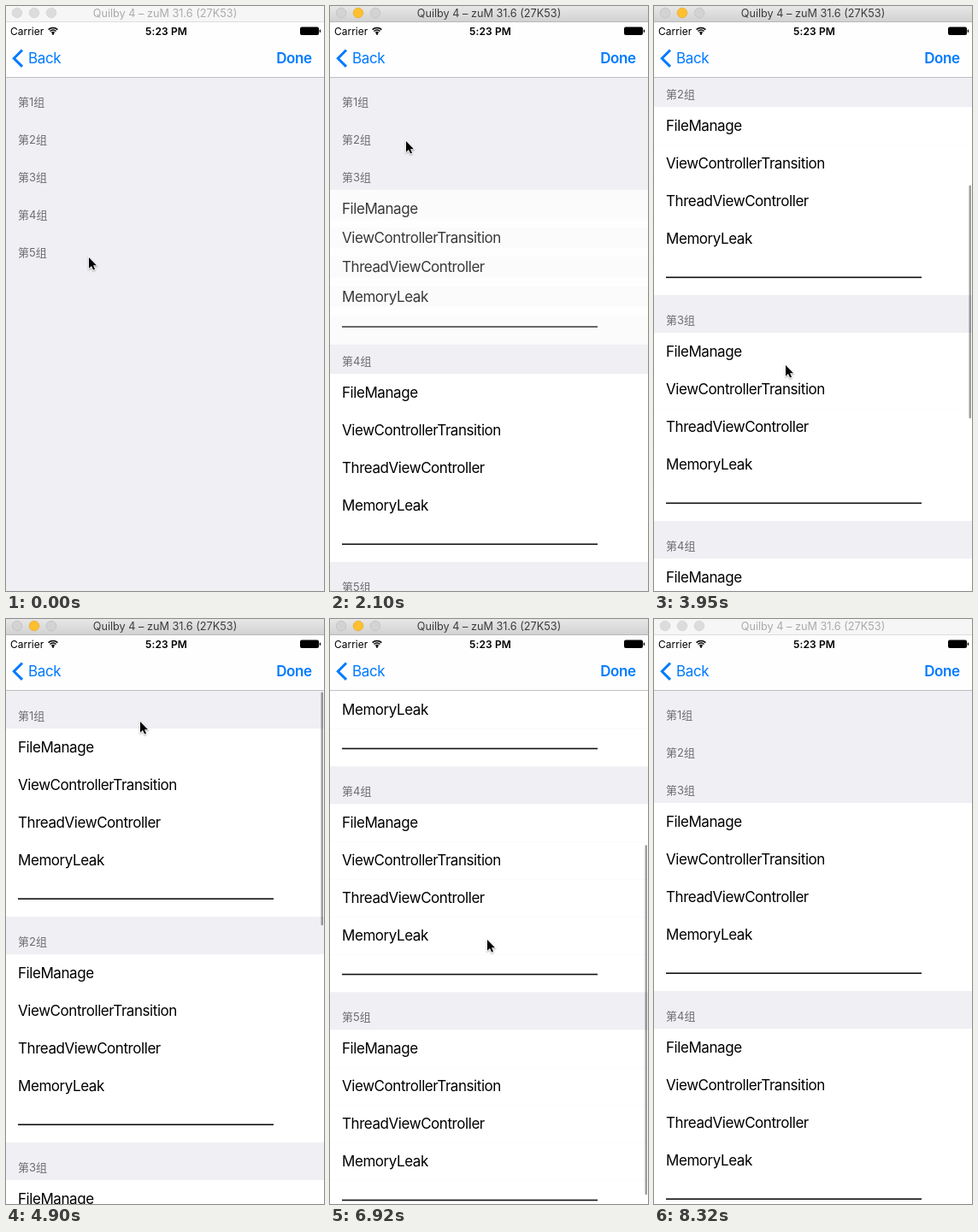
An HTML page with a canvas for the animation above (8390 ms loop, 372 by 684 pixels).

```html
<!DOCTYPE html>
<html lang="en">
<head>
<meta charset="utf-8">
<title>Collapsible groups</title>
<style>
  html, body { margin: 0; width: 100%; height: 100%; overflow: hidden; background: #efeff4; }
  canvas { display: block; }
</style>
</head>
<body>
<canvas id="stage" width="372" height="684"></canvas>
<script>
const ctx = document.getElementById('stage').getContext('2d');
const LOOP = 8390, STEP = 87.6;
const WIDTH = 372, HEIGHT = 684, TOP = 83, VIEW = 603, CELL = 44;
const FONT = 'Inter, "Noto Sans CJK SC", "Noto Sans CJK", sans-serif';
const BLUE = '#007aff';
const GROUPS = [1, 2, 3, 4, 5];
const ROWS = ['FileManage', 'ViewControllerTransition', 'ThreadViewController', 'MemoryLeak', null];

// What the pointer does: tap a group header, flick the list there and back, or leave.
const ACTIONS = [
  { at: 745, x: 97, y: 294, tap: 5 },
  { at: 1358, x: 98.5, y: 240.5, tap: 4 },
  { at: 1880, x: 95, y: 193, tap: 3 },
  { at: 2320, x: 89, y: 158, tap: 2 },
  { at: 2935, x: 84, y: 115, tap: 1 },
  { at: 3686, x: 154, y: 420, flick: 439 },
  { at: 5030, x: 157, y: 120, tap: 1 },
  { at: 5825, x: 142, y: 155, tap: 2 },
  { at: 6541, x: 184, y: 375, flick: 277 },
  { at: 8115, x: 190, y: 700 }
];
const TOGGLE_MS = 320, TRAVEL_MS = 280, REST_MS = 215;
const FLICK_MS = 440, RETURN_AFTER = 600, FADE_AFTER = 1250, FADE_MS = 200;

// Eased progress from 0 to 1 of a move that begins at start.
function progress(t, start, duration) {
  const u = Math.min(1, Math.max(0, (t - start) / duration));
  return u * u * (3 - 2 * u);
}

// Taps on a group alternately open and close it.
function openness(group, t) {
  return ACTIONS.filter(a => a.tap === group)
    .reduce((p, a, i) => p + (i % 2 ? -1 : 1) * progress(t, a.at, TOGGLE_MS), 0);
}

// The list comes back one pixel too far and settles as the scroll bar fades.
function scrollState(t) {
  let scroll = 0, bar = 0;
  ACTIONS.filter(a => a.flick).forEach(({ at, flick }) => {
    const away = progress(t, at, FLICK_MS);
    const back = progress(t, at + RETURN_AFTER, FLICK_MS);
    const faded = progress(t, at + FADE_AFTER, FADE_MS);
    scroll += flick * (away - back) - (back - faded);
    bar += progress(t, at, FADE_MS / 2) - faded;
  });
  return { scroll, bar };
}

function pointer(t) {
  return ACTIONS.reduce((p, a) => {
    const u = progress(t, a.at - REST_MS - TRAVEL_MS, TRAVEL_MS);
    return { x: p.x + (a.x - p.x) * u, y: p.y + (a.y - p.y) * u };
  }, ACTIONS[0]);
}

function rect(x, y, w, h, color) {
  ctx.fillStyle = color;
  ctx.fillRect(x, y, w, h);
}

function text(str, x, y, size, color, { weight = 400, align = 'left', spacing = 0 } = {}) {
  ctx.font = `${weight} ${size}px ${FONT}`;
  ctx.letterSpacing = spacing + 'px';
  ctx.textAlign = align;
  ctx.fillStyle = color;
  ctx.fillText(str, x, y);
}

function path(points) {
  ctx.beginPath();
  points.forEach(([x, y]) => ctx.lineTo(x, y));
}

function drawRow(label, y, alpha) {
  ctx.globalAlpha = alpha;
  rect(0, y, WIDTH, CELL, '#fff');
  if (label) text(label, 14, y + 28, 17, '#000', { spacing: -0.44 });
  else rect(14, y + 22.4, 299, 1.6, '#111');
  ctx.globalAlpha = 1;
}

function drawScrollBar(scroll, content, alpha) {
  const track = VIEW - 6;
  ctx.globalAlpha = alpha;
  ctx.fillStyle = 'rgba(0,0,0,.38)';
  ctx.beginPath();
  ctx.roundRect(368.5, TOP + 3 + scroll / content * track, 2.5, VIEW / content * track, 1.25);
  ctx.fill();
  ctx.globalAlpha = 1;
}

function drawList(t) {
  const { scroll, bar } = scrollState(t);
  let y = TOP - scroll;
  GROUPS.forEach(group => {
    const p = openness(group, t);
    const header = y;
    y += CELL;
    if (p > 0) ROWS.forEach((label, k) => drawRow(label, y + CELL * k * p, p));
    text(`第${group}组`, 14, header + 34, 13, '#6d6d72');
    y += CELL * ROWS.length * p;
  });
  if (bar > 0) drawScrollBar(scroll, y + scroll - TOP, bar);
}

function drawTitleBar(active) {
  const fill = ctx.createLinearGradient(0, 0, 0, 18);
  fill.addColorStop(0, active ? '#e7e7e7' : '#f6f6f6');
  fill.addColorStop(1, active ? '#d2d2d2' : '#f6f6f6');
  rect(0, 0, WIDTH, 18, fill);
  rect(0, 18, WIDTH, 1, active ? '#b8b8b8' : '#dedede');
  [13, 33, 53].forEach(x => {
    const lit = active && x === 33;
    ctx.beginPath();
    ctx.arc(x, 8, 5.8, 0, 7);
    ctx.fillStyle = lit ? '#ffbf2f' : active ? '#d3d3d3' : '#dcdcdc';
    ctx.strokeStyle = lit ? '#e6aa2c' : active ? '#bdbdbd' : '#d0d0d0';
    ctx.lineWidth = 0.7;
    ctx.fill();
    ctx.stroke();
  });
  text('Quilby 4 – zuM 31.6 (27K53)', 186, 13, 12.7, active ? '#3c3c3c' : '#ababab', { align: 'center' });
}

function drawWifi(x, y) {
  ctx.strokeStyle = ctx.fillStyle = '#000';
  ctx.lineWidth = 1.5;
  [2.4, 5, 7.6].forEach(r => {
    ctx.beginPath();
    ctx.arc(x, y, r, -Math.PI * 0.75, -Math.PI * 0.25);
    ctx.stroke();
  });
  ctx.beginPath();
  ctx.arc(x, y - 0.5, 1.2, 0, 7);
  ctx.fill();
}

function drawBattery() {
  ctx.fillStyle = '#000';
  ctx.beginPath();
  ctx.roundRect(344, 24.5, 22, 9.5, 2);
  ctx.roundRect(366.7, 27.5, 1.4, 3.4, 0.7);
  ctx.fill();
}

function drawNavBar() {
  rect(0, 19, WIDTH, 64, '#fefefe');
  rect(0, 83, WIDTH, 0.8, '#b2b2b4');
  text('Carrier', 5, 33.5, 12, '#000');
  drawWifi(55, 33);
  text('5:23 PM', 187.5, 33.5, 12, '#000', { weight: 600, align: 'center', spacing: 0.1 });
  drawBattery();
  path([[19, 51.5], [9.3, 61.2], [19, 70.9]]);
  ctx.strokeStyle = BLUE;
  ctx.lineWidth = 3;
  ctx.stroke();
  text('Back', 26, 67, 17, BLUE, { spacing: -0.35 });
  text('Done', 357.5, 67, 17, BLUE, { weight: 600, align: 'right', spacing: -0.44 });
}

function drawPointer({ x, y }) {
  ctx.save();
  ctx.translate(x, y);
  ctx.scale(0.88, 0.88);
  path([[0, 0], [0, 14.5], [3.4, 11.4], [5.8, 16.6], [8, 15.6], [5.7, 10.6], [10.2, 10.4]]);
  ctx.closePath();
  ctx.shadowColor = 'rgba(0,0,0,.35)';
  ctx.shadowBlur = 2;
  ctx.shadowOffsetY = 1;
  ctx.strokeStyle = '#fff';
  ctx.lineWidth = 1.8;
  ctx.stroke();
  ctx.shadowColor = 'transparent';
  ctx.fillStyle = '#000';
  ctx.fill();
  ctx.restore();
}

function draw(t) {
  rect(0, 0, WIDTH, HEIGHT, '#efeff4');
  drawList(t);
  drawNavBar();
  drawTitleBar(t > 610 && t < 8320);
  drawPointer(pointer(t));
}

// The screen refreshes in fixed steps rather than continuously.
function tick() {
  const t = performance.now() % LOOP;
  draw(Math.floor((t + 6) / STEP) * STEP);
  requestAnimationFrame(tick);
}
tick();
</script>
</body>
</html>
```
